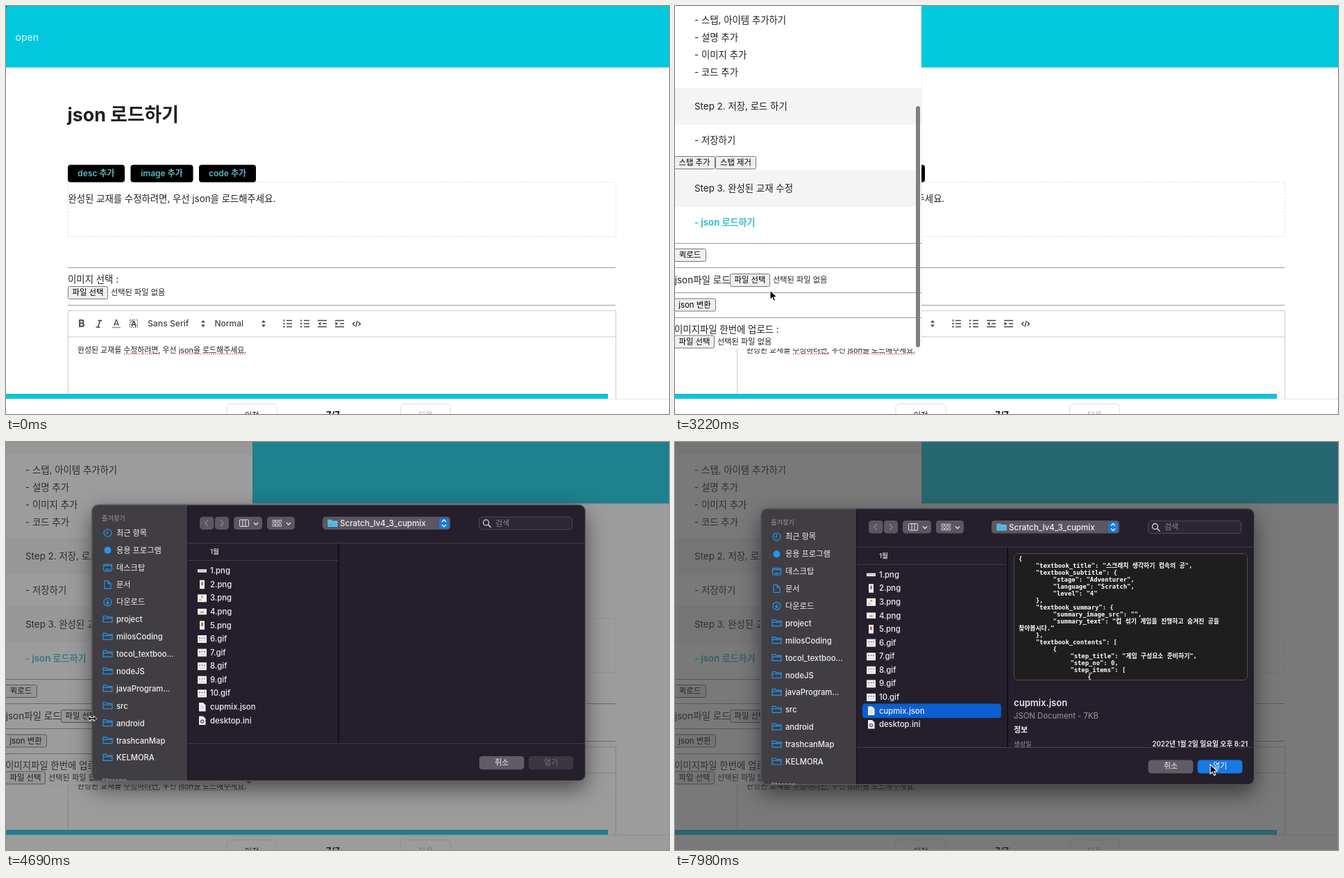
An HTML page for the animation above (8 s loop, 955 px wide and 587 px high).

```html
<!DOCTYPE html>
<html lang="ko">
<head>
<meta charset="utf-8">
<style>
  html, body { margin: 0; height: 100%; overflow: hidden; background: #fff; }
  svg { display: block; width: 100vw; height: 100vh; }
  text { font-family: Inter, "Noto Sans CJK KR", sans-serif; white-space: pre; }
  .mono text { font-family: "DejaVu Sans Mono", "Noto Sans CJK KR", monospace; font-weight: 700; }
  #panel { filter: drop-shadow(0 12px 15px rgba(0, 0, 0, .5)); }
</style>
</head>
<body>
<svg id="stage" viewBox="0 0 955 587" preserveAspectRatio="none"></svg>
<script>
const LOOP = 8000;
const CYAN = '#02c8de';

// ---- markup helpers; y of a text is its middle ----
const text = (x, y, s, size, fill = '#212121', weight = 400, anchor = 'start') =>
  `<text x="${x}" y="${y + size * .36}" font-size="${size}" fill="${fill}" font-weight="${weight}" text-anchor="${anchor}">${s}</text>`;
const rect = (x, y, w, h, fill, r = 0, extra = '') =>
  `<rect x="${x}" y="${y}" width="${w}" height="${h}" rx="${r}" fill="${fill}" ${extra}/>`;
const path = (d, stroke, width = 1, fill = 'none') =>
  `<path d="${d}" stroke="${stroke}" stroke-width="${width}" fill="${fill}"/>`;
const hline = (x1, x2, y, color = '#9a9a9a') => path(`M${x1} ${y}H${x2}`, color);
const group = (id, s, extra = '') => `<g id="${id}" ${extra}>${s}</g>`;
const button = (x, y, w, s) =>
  rect(x + .5, y + .5, w - 1, 18, '#efefef', 2, 'stroke="#767676"') + text(x + w / 2, y + 9, s, 11.4, '#000', 400, 'middle');
const filePick = (x, y) => button(x, y, 58, '파일 선택') + text(x + 62, y + 9, '선택된 파일 없음', 11.2);

// ---- page ----
function blackButton(x, w, s) {
  return rect(x, 228.5, w, 25, '#000', 4) + text(x + w / 2, 241, s, 12, '#62b6c3', 600, 'middle');
}

function toolbar() {
  const ink = '#444';
  const sort = x => path(`M${x - 3} 455.5l3-3.5 3 3.5zM${x - 3} 458.5l3 3.5 3-3.5z`, 'none', 0, ink);
  const rows = (x, d) => path(`M${x} 452.5h8M${x + d} 457h${8 - d}M${x} 461.5h8`, ink, 1.5);
  return text(109, 457, 'B', 14, ink, 700, 'middle') +
    path('M132.5 452.5h6M129.5 462h6M135.5 452.5l-3 9.5', ink, 1.5) +
    text(159, 456, 'A', 12, ink, 500, 'middle') + path('M153 462.5h12', '#888', 1.5) +
    rect(178.5, 451.5, 11, 11, 'none', 0, 'stroke="#555" stroke-dasharray="1.5 1.5"') +
    path('M178 456l5-5M178 460l3-3M186 462l4-4M184 451l-6 6', '#777', .8) +
    text(184, 457.5, 'A', 11, ink, 700, 'middle') +
    text(204, 457, 'Sans Serif', 12.2, ink, 500) + sort(284) +
    text(300.5, 457, 'Normal', 12, ink, 500) + sort(371) +
    rows(404, 0) + path('M400.5 451v3M399 457h3M399 461.5h3', ink, 1.3) +
    rows(429, 0) + path('M424 452.5h2M424 457h2M424 461.5h2', ink, 1.8) +
    path('M449 452.5h13M456 457h6M449 461.5h13', ink, 1.5) + path('M453.5 454.5v5l-4-2.5z', 'none', 0, ink) +
    path('M474 452.5h13M481 457h6M474 461.5h13', ink, 1.5) + path('M474.5 454.5v5l4-2.5z', 'none', 0, ink) +
    path('M502.5 454.5l-3 2.7 3 2.7M507.5 454.5l3 2.7-3 2.7M506 453l-2 8.5', ink, 1.4);
}

function page() {
  const note = '완성된 교재를 수정하려면, 우선 json을 로드해주세요.';
  const spell = (a, b) => path(`M${a} 500.5H${b}`, '#d8645f', 1.3).replace('<path', '<path stroke-dasharray="1.6 1.4"');
  return rect(0, 0, 955, 587, '#fff') + rect(0, 88, 955, 1.5, '#d3f0f4') + rect(0, 0, 955, 88.3, CYAN) +
    path('M0 0h4Q0 0 0 4z', 'none', 0, '#456') +
    text(13.5, 44.5, 'open', 14, '#e8fbfd') +
    text(88.5, 156, 'json 로드하기', 26.8, '#212121', 700) +
    rect(89.5, 253.5, 789, 78, 'none', 0, 'stroke="#e2e2e2" stroke-dasharray="3 2"') +
    blackButton(89, 82, 'desc 추가') + blackButton(179.5, 90, 'image 추가') + blackButton(278, 82, 'code 추가') +
    text(89.5, 277, note, 13.38) +
    hline(89, 878, 376.5) + text(89, 393.5, '이미지 선택 :', 13.4) + filePick(89, 403) + hline(89, 878, 430.5) +
    rect(89.5, 438.5, 789, 150, 'none', 0, 'stroke="#ccc"') + hline(89, 878, 476, '#ccc') +
    toolbar() + text(103, 495, note, 10.9) +
    spell(170, 221) + spell(249, 281) + spell(283, 345);
}

function footer() {
  const box = x => rect(x, 572.5, 72, 30, '#fff', 5, 'stroke="#ddd"');
  return rect(0, 558, 867, 7, CYAN) + rect(0, 558, 867, 1.5, '#25b3c4') +
    rect(0, 565, 955, 22, '#fff') + hline(0, 955, 565.5, '#e6e6e6') +
    box(318) + box(568.5) + text(354, 588.5, '이전', 11.5, '#111', 500, 'middle') +
    text(471, 588.5, '7/7', 12.5, '#111', 700, 'middle') + text(604.5, 588.5, '다음', 11.5, '#aaa', 400, 'middle');
}

// ---- slide-in menu, laid out fully scrolled ----
function menu() {
  const step = (y, s) => rect(0, y - 26, 355, 53, '#f4f4f4') + text(28, y, s, 13.4);
  const items = ['스탭, 아이템 추가하기', '설명 추가', '이미지 추가', '코드 추가'];
  const upper = step(-9, '') + items.map((s, i) => text(28, 40 + i * 25, '- ' + s, 13.4)).join('') +
    step(164, 'Step 2. 저장, 로드 하기') + text(28, 213, '- 저장하기', 13.4);
  const lower = group('stepButtons', button(-2, 216, 60, '스탭 추가') + button(58, 216, 59, '스탭 제거')) +
    step(262, 'Step 3. 완성된 교재 수정') + text(28, 311, '- json 로드하기', 13.1, '#3bbdd0', 700) +
    [341.5, 376.5, 412.5, 448.5].map(y => hline(0, 355, y)).join('') +
    button(-2, 349, 47, '퀵로드') + text(-.3, 394, 'json파일 로드', 13.5) + filePick(79, 385) +
    button(-2, 420.5, 61, 'json 변환') + text(-1, 465, '이미지파일 한번에 업로드 :', 13.4) + filePick(-1, 473.5);
  return rect(0, 0, 356, 494, '#000', 0, 'opacity=".05"') + rect(0, 0, 355, 493, '#fff') +
    group('upper', upper) + group('lower', lower) + rect(347, 0, 6, 358, '#808080', 3, 'id="thumb"');
}

// ---- open-file dialog ----
const folder = (x, y, stroke, fill = 'none') =>
  path(`M${x} ${y + 4}v-9h4.5l1.5 1.7h7v7.3zM${x} ${y - 1.5}h13`, stroke, 1.2, fill);

function placeIcon(i, y) {
  const blue = '#2296f3';
  const disc = `<circle cx="146.5" cy="${y}" r="5.5" stroke="${blue}" stroke-width="1.2" fill="none"/>`;
  if (i == 0) return disc + path(`M146.5 ${y - 3.5}v4h-3`, blue, 1.2);
  if (i == 1) return `<circle cx="146.5" cy="${y}" r="5" fill="${blue}"/>`;
  if (i == 2) return rect(140.5, y - 4.5, 12, 9.5, 'none', 1.5, `stroke="${blue}" stroke-width="1.2"`) + path(`M141 ${y - 2.5}h11M143 ${y + 2.5}h7`, blue, 1.2);
  if (i == 3) return path(`M142 ${y - 5.5}h5l4 4v7h-9zM147 ${y - 5.5}v4h4`, blue, 1.2);
  if (i == 4) return disc + path(`M146.5 ${y - 3}v5.5M144 ${y}l2.5 2.7 2.5-2.7`, blue, 1.2);
  return folder(140, y, blue);
}

function fileIcon(i, y) {
  if (i > 9) return path(`M278 ${y - 6}h6l3.5 3.5v9h-9.5z`, 'none', 0, '#eee') +
    (i > 10 ? `<circle cx="282.5" cy="${y + 1.5}" r="2" fill="none" stroke="#555" stroke-width="1.3"/>` : path(`M280 ${y}h5M280 ${y + 2.5}h5`, '#bbb', .8));
  if (i == 0) return rect(276, y - 2, 13, 4.5, '#eee') + path(`M277 ${y}h11`, '#999', .8);
  if (i == 1 || i == 4) return rect(279, y - 6, 7, 12.5, '#eee') + rect(281, y - 3.5, 3, 5, i == 1 ? '#7a86a8' : '#d0694f');
  if (i == 3) return rect(276, y - 4, 13, 8.5, '#eee') + rect(280, y, 5, 2, '#d98a6a');
  return rect(276, y - 5, 13, 11, '#f2f2f2') +
    (i == 2 ? rect(281, y - 3, 3, 3, '#e3a05a') + rect(278, y + 2, 4, 2, '#bbb') : path(`M278 ${y - 1}h2M281.5 ${y - 1}h2M285 ${y - 1}h2`, '#667', 1.2) + hline(278, 287, y + 3, '#ccc'));
}

function preview() {
  const lines = [
    [0, '{'], [1, '"textbook_title": "스크래치 생각하기 컵속의 공",'], [1, '"textbook_subtitle": {'],
    [2, '"stage": "Adventurer",'], [2, '"language": "Scratch",'], [2, '"level": "4"'], [1, '},'],
    [1, '"textbook_summary": {'], [2, '"summary_image_src": "",'], [2, '"summary_text": "컵 섞기 게임을 진행하고 숨겨진 공을'],
    [0, '찾아봅시다."'], [1, '},'], [1, '"textbook_contents": ['], [2, '{'],
    [3, '"step_title": "게임 구성요소 준비하기",'], [3, '"step_no": 0,'], [3, '"step_items": ['], [4, '{']];
  return rect(488.5, 160.5, 336, 182, '#1e1e1e', 6, 'stroke="#4e4b52"') +
    `<g class="mono">${lines.map(([n, s], i) => text(495 + 24.8 * n, 167.5 + 10 * i, s, 8.85, '#fff')).join('')}</g>`;
}

function dialog() {
  const places = ['최근 항목', '응용 프로그램', '데스크탑', '문서', '다운로드', 'project', 'milosCoding', 'tocol_textboo...',
    'nodeJS', 'javaProgram...', 'src', 'android', 'trashcanMap', 'KELMORA'];
  const files = ['1.png', '2.png', '3.png', '4.png', '5.png', '6.gif', '7.gif', '8.gif', '9.gif', '10.gif', 'cupmix.json', 'desktop.ini'];
  const grey = '#9b989f', pill = '#5b5760', line = '#45414b', pale = '#e4e2e6';
  const tool = (x, w) => rect(x, 113, w, 18.5, pill, 4.5);
  const down = x => path(`M${x} 121.5l3 3 3-3`, pale, 1.4);
  const cell = (x, y) => rect(x, y, 3.4, 3.4, 'none', .5, `stroke="${pale}" stroke-width=".9"`);
  const grid = [384, 388.6, 393.2].map(x => cell(x, 118) + cell(x, 123.5)).join('');
  const bar = tool(279, 20.5) + tool(301, 20) + path('M291 118l-4 4.3 4 4.3M309 118l4 4.3-4 4.3', '#8f8b95', 1.2) +
    tool(328, 41) + rect(336.5, 117.5, 13, 9.5, 'none', 1, `stroke="${pale}"`) + path('M341 117.5v9.5M345 117.5v9.5', pale) + down(357) +
    tool(376, 40) + grid + down(404) +
    tool(456, 184) + folder(464, 123, '#62c8ee', '#49b4e2') + text(481, 122.5, 'Scratch_lv4_3_cupmix', 11.6, '#f0eff1', 500) +
    rect(624, 115, 14, 15, '#1a78e0', 3.5) + path('M628 120.5l3-3 3 3M628 124.5l3 3 3-3', '#fff', 1.3) +
    rect(681.5, 113.5, 134, 18, '#2c2733', 4.5, 'stroke="#4d4955"') +
    '<circle cx="691.5" cy="121.5" r="4" fill="none" stroke="#ddd" stroke-width="1.3"/>' + path('M694.5 124.5l4 4', '#ddd', 1.4) +
    text(705, 122.5, '검색', 11, '#8b8791');
  const list = files.map((s, i) => {
    const y = 190.7 + 19.58 * i;
    return fileIcon(i, y) + text(294, y, s, 11.3, '#f0eff1', 500);
  }).join('');
  const info = text(488, 375.5, 'cupmix.json', 13.1, '#e6e4e8', 600) + text(488, 393.5, 'JSON Document - 7KB', 11.3, grey) +
    text(488, 414, '정보', 11, '#eee', 700) + text(488, 434.5, '생성일', 9.2, grey, 500) +
    text(825, 434.5, '2022년 1월 2일 일요일 오후 8:21', 9.7, '#eee', 600, 'end');
  const frame = [123.3, 95.3, 711.7, 398.2];
  return rect(...frame, '#241f2a', 10, 'id="panel"') +
    `<clipPath id="round">${rect(...frame, '#000', 10)}</clipPath><g clip-path="url(#round)">` +
    rect(123, 95, 138, 399, '#403e43') + path('M261.5 95V494', '#15121a') +
    text(138, 115.5, '즐겨찾기', 9.2, grey, 500) +
    places.map((s, i) => placeIcon(i, 136.3 + 24.9 * i) + text(159, 136.3 + 24.9 * i, s, 11.2, '#f0eff1', 500)).join('') +
    text(138, 493.5, 'Storage', 9.6, grey, 500) + '</g>' +
    bar + hline(262, 834, 151, line) + hline(262, 478, 176, line) + path('M479 151V439', '#0d0a11', 1.4) +
    text(294, 163.5, '1월', 9.6, '#c9c6cc', 600) +
    group('picked', rect(270, 376.5, 199.8, 20.5, '#0b5ed1', 4)) + list + group('info', info) + group('preview', preview()) +
    hline(262, 834, 439.5, line) +
    rect(681.7, 457.5, 64.6, 19.3, '#605c65', 4.5) + text(714, 466.5, '취소', 11, '#f0eff1', 500, 'middle') +
    rect(752.7, 457.5, 64.6, 19.3, '#3b3741', 4.5, 'id="openBox"') + text(785, 466.5, '열기', 11, '#77737d', 500, 'middle').replace('<text', '<text id="openText"') +
    rect(123.9, 95.9, 710.5, 397, 'none', 9.5, 'stroke="#6d6a71"');
}

// ---- pointer, hotspot at 0,0 ----
const pointer =
  group('ring', '<circle r="27.3" fill="none" stroke="#fff" stroke-opacity=".7" stroke-width="2"/><circle r="26.5" fill="none" stroke="#111" stroke-width="1.6"/>') +
  group('arrow', path('M0 0V13.5l3.2-2.9 2.2 5 2.3-1-2.1-4.9 4.4-.2z', '#fff', 1.1, '#000')) +
  group('hand', path('M-1.5 0q1.5-1.5 3 0v5l5.5 1.2q2 .5 1.7 2.8l-1 6h-7.5l-4.7-6q0-2 2-1.2l1 1z', '#222', 1, '#fff') + path('M3 10v3M5.2 10v3', '#222', .8)) +
  group('resize', path('M-6.5 0l4-4v2.7h5V-4l4 4-4 4V1.3h-5V4z', '#fff', 1, '#000'));

const stage = document.getElementById('stage');
stage.innerHTML = page() + group('menu', menu()) + footer() +
  rect(0, 0, 955, 587, '#3a383a', 0, 'id="dim"') + group('dialog', dialog()) + group('pointer', pointer);

// ---- motion ----
const $ = Object.fromEntries([...stage.querySelectorAll('[id]')].map(e => [e.id, e]));
const show = (e, on) => e.style.display = on ? '' : 'none';
const move = (e, x, y) => e.setAttribute('transform', `translate(${x} ${y})`);
const within = (t, a, b) => t >= a && t < b;
const ease = (t, a, b) => {
  const k = Math.min(1, Math.max(0, (t - a) / (b - a)));
  return k * k * (3 - 2 * k);
};

const route = [
  [490, 955, 430], [1600, 30, 45], [2170, 30, 45], [2400, 350, 80], [2800, 350, 211], [3080, 350, 211],
  [3220, 137, 409], [3360, 130, 412], [3570, 130, 412], [4130, 124, 398], [5180, 124, 398], [5390, 172, 369],
  [5950, 240, 372], [6020, 240, 372], [6790, 325, 386], [7450, 325, 386], [7910, 771, 464]];
const clicks = [[1610, 1890], [4060, 4260], [7280, 7480]];

function pointerAt(t) {
  let [, x, y] = route[0];
  for (let i = 1; i < route.length; i++) {
    const k = ease(t, route[i - 1][0], route[i][0]);
    x += (route[i][1] - route[i - 1][1]) * k;
    y += (route[i][2] - route[i - 1][2]) * k;
  }
  return [x, y];
}

function draw(t) {
  const hover = within(t, 3080, 3600);
  const left = 187 * (1 - ease(t, 2400, 2800));
  show($.menu, t > 1900);
  move($.menu, -360 * (1 - ease(t, 1900, 2100)), 0);
  move($.upper, 0, left - (hover ? 20 : 0));
  move($.lower, 0, left);
  show($.stepButtons, hover);
  $.thumb.setAttribute('y', hover ? 144 : 133 * (1 - left / 187));
  $.thumb.setAttribute('height', hover ? 347 : 358);
  show($.thumb, t > 2300);

  $.dim.setAttribute('opacity', .67 * ease(t, 4410, 4830));
  const shown = Math.min(1, Math.max(0, (t - 4455) / 210));
  show($.dialog, shown > 0);
  $.dialog.setAttribute('opacity', shown);
  move($.dialog, 0, -26 * Math.max(0, (4830 - t) / 280) ** 2.2);

  const picked = t >= 7350;
  show($.picked, picked);
  show($.info, t >= 7490);
  show($.preview, t >= 7700);
  $.openBox.setAttribute('fill', picked ? '#1879e2' : '#3b3741');
  $.openText.setAttribute('fill', picked ? '#fff' : '#77737d');

  show($.pointer, t >= 490);
  move($.pointer, ...pointerAt(t));
  const hand = within(t, 1480, 2200), resize = within(t, 4480, 5200);
  show($.hand, hand);
  show($.resize, resize);
  show($.arrow, !hand && !resize);
  show($.ring, clicks.some(([a, b]) => within(t, a, b)));
}

function tick() {
  draw(performance.now() % LOOP);
  requestAnimationFrame(tick);
}
tick();
</script>
</body>
</html>
```
